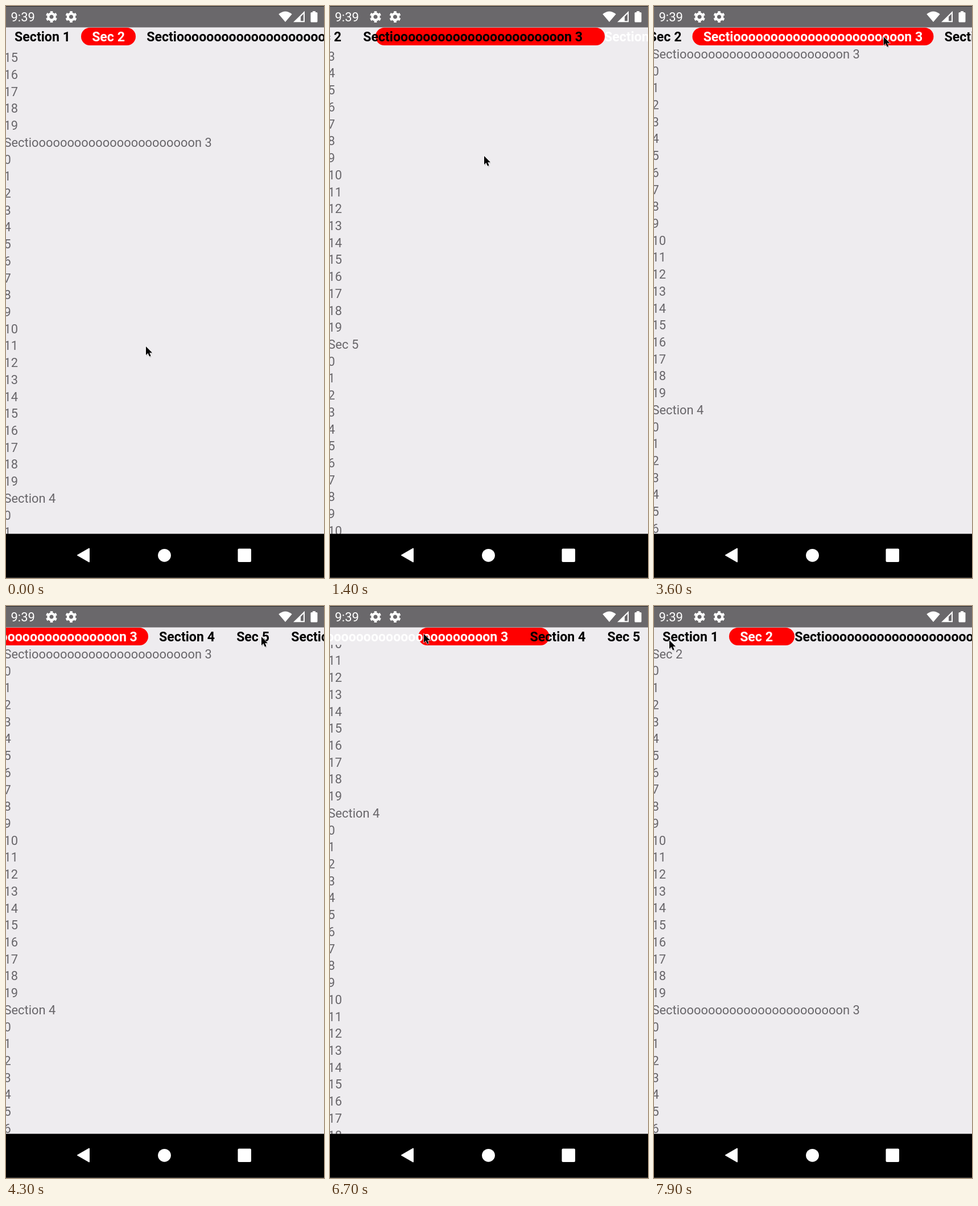
Write an HTML page that moves like this. It is 559 px wide and 1003 px high and loops after 8 s.

```html
<!DOCTYPE html>
<html lang="en">
<head>
<meta charset="utf-8">
<title>Section tabs</title>
<style>
  html, body { margin: 0; width: 100%; height: 100%; overflow: hidden; background: #eeecef; }
  body { position: relative; font-family: Roboto, sans-serif; }
  #view, #bar { position: absolute; left: 0; width: 559px; overflow: hidden; }
  #view { top: 68px; height: 858px; }
  #list { position: absolute; left: -3.5px; top: 1.6px; font-size: 21.89px; color: #68666a; white-space: pre; }
  #list div { height: 29.71875px; line-height: 29.71875px; }
  #bar { top: 37.5px; height: 31px; }
  #strip { position: absolute; left: -4px; top: 0; display: flex; }
  #pill { position: absolute; top: 0; height: 31px; border-radius: 15.5px; background: #f00; }
  .tab { position: relative; top: 1.8px; padding: 0 19.1px; font-size: 23.15px; line-height: 31px; font-weight: 700; color: #000; white-space: pre; }
  .tab.on { color: #fff; }
  svg { position: absolute; left: 0; top: 0; }
</style>
</head>
<body>
<div id="view"><div id="list"></div></div>
<div id="bar"><div id="strip"><div id="pill"></div></div></div>
<svg width="559" height="1003" viewBox="0 0 559 1003">
  <defs>
    <g id="gear" fill="none" stroke="#fff">
      <circle r="5.7" stroke-width="4.2"/>
      <circle r="8.4" stroke-width="3.4" pathLength="12" stroke-dasharray="1" stroke-dashoffset="-.5"/>
    </g>
  </defs>
  <rect width="559" height="37.5" fill="#6a686b"/>
  <rect width="559" height="1" fill="#2b2a2c"/>
  <use href="#gear" x="80" y="19"/>
  <use href="#gear" x="114.5" y="19"/>
  <g fill="#fff">
    <text x="8.5" y="27.4" font-size="22" font-family="Roboto, sans-serif">9:39</text>
    <path d="M479.3 14.3Q491 4.7 502.7 14.3L491 28Z"/>
    <path fill-rule="evenodd" d="M505 28.3L525 8.8V28.3ZM518 18.8V26.2H523V13.8Z"/>
    <rect x="539" y="9" width="5" height="4"/>
    <rect x="535.5" y="11" width="12" height="17.5" rx="1.5"/>
  </g>
  <rect y="925.5" width="559" height="78" fill="#000"/>
  <rect y="1002" width="559" height="1" fill="#444"/>
  <g fill="#fff">
    <path d="M126 963L146 951.5V974.5Z" stroke="#fff" stroke-width="2" stroke-linejoin="round"/>
    <circle cx="278.5" cy="963.3" r="11.4"/>
    <rect x="407.5" y="951.5" width="23.5" height="23.5" rx="2"/>
  </g>
  <g id="cursor">
    <path d="M1 2V17L4.5 13.8L7 19.5L9.6 18.4L7.2 13H12Z" opacity=".18"/>
    <path d="M0 0V15L3.5 11.8L6 17.5L8.6 16.4L6.2 11H11Z" stroke="#fff" stroke-width="1.2" paint-order="stroke"/>
  </g>
</svg>
<script>
const $ = id => document.getElementById(id);
const ROW = 29.71875, ROWS_PER_SECTION = 21, MIDDLE = 279.5;
const names = ['Section 1', 'Sec 2', `Secti${'o'.repeat(23)}n 3`, 'Section 4', 'Sec 5', `Secti${'o'.repeat(12)}n 6`];

const add = (parent, text, className = '') => {
  const div = document.createElement('div');
  div.textContent = text;
  div.className = className;
  parent.append(div);
  return div;
};
const tabs = names.map(name => {
  for (const text of [name, ...Array(20).keys()]) add($('list'), text);
  return add($('strip'), name, 'tab');
});

// Section geometry follows from the laid-out tabs.
const boxes = tabs.map(tab => tab.getBoundingClientRect());
const left = n => boxes[n - 1].left;
const width = n => boxes[n - 1].width;
const centred = n => Math.max(0, left(n) + width(n) / 2 - MIDDLE);
const firstRow = n => (n - 1) * ROWS_PER_SECTION;

const ease = u => (1 - Math.cos(Math.PI * Math.min(1, u))) / 2;
const mix = (a, b, u) => a + (b - a) * u;

// Each move is [start time, value...]; the first one is the resting state.
function glide(moves, duration, col = 1) {
  return t => {
    const i = moves.findLastIndex(m => m[0] <= t);
    const from = moves[Math.max(0, i - 1)], to = moves[i];
    return mix(from[col], to[col], ease((t - to[0]) / duration));
  };
}

// Selections: the first few come from flicking the list, the rest from taps.
const picks = [[0, 2], [445, 3], [1305, 4], [2425, 3], [4500, 5], [5700, 4], [6490, 3], [7440, 2]];
const taps = picks.slice(3);
const toMoves = (list, value) => list.map(([at, n]) => [at, value(n)]);

const flickEnd = 68.2;
const flick = t => mix(36.78, flickEnd, ease(t / 1615));
const tapped = glide([[0, flickEnd], ...toMoves(taps, firstRow)], 450);
const listRow = t => t < taps[0][0] ? flick(t) : tapped(t);

const tabDrag = [3600, 402];
const tabScroll = glide([...toMoves(picks, centred), tabDrag].sort((a, b) => a[0] - b[0]), 460);
const pillLeft = glide(toMoves(picks, left), 470);
const pillWidth = glide(toMoves(picks, width), 545);

const path = [[0, 246, 597], [400, 271, 263], [1900, 142, 63], [3000, 430, 54], [3500, 250, 54],
  [3900, 449, 54], [5100, 157, 55], [6050, 165, 49], [6950, 27, 60]];
const cursorX = glide(path, 400, 1);
const cursorY = glide(path, 400, 2);

const start = performance.now();
function draw() {
  // The screen advances ten times a second.
  const t = Math.floor((performance.now() - start) % 8000 / 100) * 100;
  const picked = picks.findLast(p => p[0] <= t)[1];
  tabs.forEach((tab, i) => tab.classList.toggle('on', i + 1 === picked));
  $('list').style.transform = `translateY(${-listRow(t) * ROW}px)`;
  $('strip').style.transform = `translateX(${-tabScroll(t)}px)`;
  $('pill').style.left = pillLeft(t) + 4 + 'px';
  $('pill').style.width = pillWidth(t) + 'px';
  $('cursor').setAttribute('transform', `translate(${cursorX(t)} ${cursorY(t)})`);
  requestAnimationFrame(draw);
}
draw();
</script>
</body>
</html>
```
